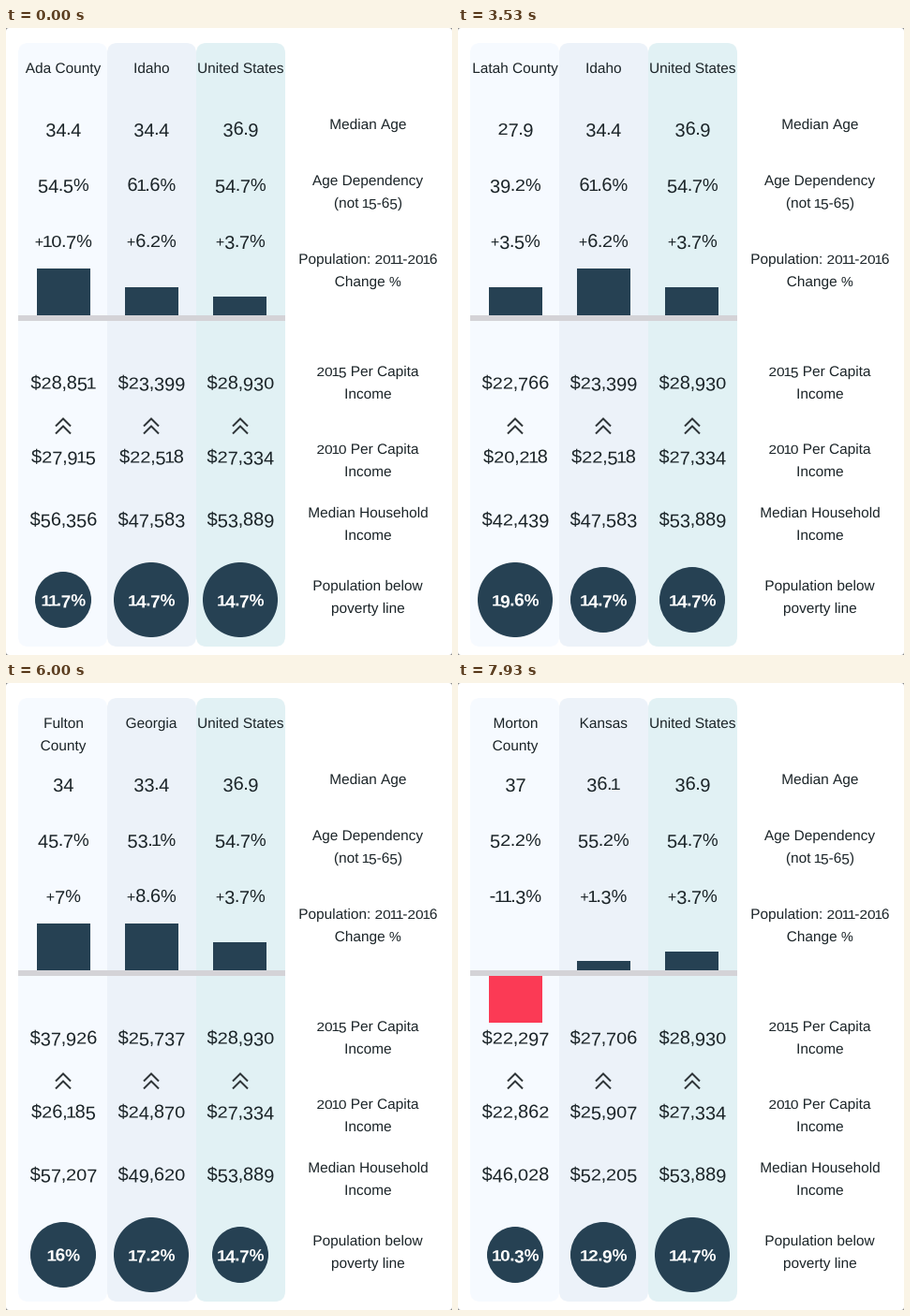
A matplotlib script for the animation above (8 s loop, 476 px wide and 670 px high).

```python
import math
from functools import lru_cache

import matplotlib.pyplot as plt
import numpy as np
from matplotlib.animation import FuncAnimation
from matplotlib.patches import Circle, FancyBboxPatch, PathPatch, Rectangle
from matplotlib.path import Path
from matplotlib.textpath import TextPath

W, H, DPI = 476, 670, 100
LOOP, STEP = 8000, 50
INK, NAVY, RED, RULE = "#1b2428", "#264153", "#fb3a55", "#d4d3d7"
COLUMNS = [(13, "#f6faff"), (108, "#ecf2f9"), (203, "#e1f1f4")]
CENTERS = (61, 155, 250)
BASELINES = {"age": 114, "dep": 174, "pop": 234, "pc15": 385.5,
             "pc10": 464.5, "house": 531.5}
LABELS = [("Median Age", 108), ("Age Dependency", 168), ("(not 15-65)", 192),
          ("Population: 2011-2016", 252), ("Change %", 276),
          ("2015 Per Capita", 372), ("Income", 396),
          ("2010 Per Capita", 455), ("Income", 479),
          ("Median Household", 523), ("Income", 547),
          ("Population below", 601), ("poverty line", 625)]

KEYS = ("name", "age", "dep", "pop", "pc15", "pc10", "house", "poor")
IDAHO = ("Idaho", 34.4, 61.6, 6.2, 23399, 22518, 47583, 14.7)
COUNTIES = [("Ada County", 34.4, 54.5, 10.7, 28851, 27915, 56356, 11.7),
            ("Latah County", 27.9, 39.2, 3.5, 22766, 20218, 42439, 19.6),
            ("Fulton\nCounty", 34, 45.7, 7.8, 37926, 37211, 57207, 16),
            ("Dallas\nCounty", 32.3, 52.2, 7, 27605, 26185, 50270, 17.9),
            ("Morton\nCounty", 37, 52.2, -11.3, 22297, 22862, 46028, 10.3)]
STATES = [IDAHO, IDAHO,
          ("Georgia", 35, 53.1, 5.1, 25737, 25134, 49620, 17.2),
          ("Texas", 33.4, 55.2, 8.6, 26999, 24870, 53207, 15.9),
          ("Kansas", 36.1, 55.2, 1.3, 27706, 25907, 52205, 12.9)]
NATION = [("United States", 36.9, 54.7, 3.7, 28930, 27334, 53889, 14.7)] * 5
TABLE = (COUNTIES, STATES, NATION)

# Each row refreshes at its own delay (county, state, nation) after a switch
SWITCHES = (2500, 4400, 6150, 7730)
DELAYS = {"name": (0, 0, 0), "age": (100, -150, 0), "dep": (280, 280, 0),
          "pop": (-200, -200, 0), "pc15": (50, 50, 0), "pc10": (-180, -180, 0),
          "house": (100, 100, 0), "poor": (50, 50, 0)}

# Gentle old-style figures: (vertical scale, uniform scale, shift in em)
SHAPES = {**dict.fromkeys("012", (0.86, 1, 0)),
          **dict.fromkeys("34579", (1, 1, -0.1)),
          "%": (1, 0.94, 0), "+": (1, 0.8, 0)}
ADVANCES = {"1": 0.41, ".": 0.23, ",": 0.25}


@lru_cache(maxsize=None)
def glyph(char, weight):
    """Outline and advance of one character, one em high."""
    font = {"family": "Liberation Sans", "weight": weight}

    def outline(s):
        return TextPath((0, 0), s, size=100, prop=font)

    bar = outline("|").vertices[:, 0].max()
    advance = (outline(char + "|").vertices[:, 0].max() - bar) / 100
    if char == " ":
        return None, None, advance
    path = outline(char)
    verts = path.vertices / 100
    squash, scale, shift = SHAPES.get(char, (1, 1, 0))
    verts = verts * (scale, scale * squash) + (0, shift)
    advance *= scale
    if char in ADVANCES:
        verts = verts + ((ADVANCES[char] - advance) / 2, 0)
        advance = ADVANCES[char]
    return verts, path.codes, advance


@lru_cache(maxsize=None)
def text_path(text, cx, baseline, size, weight="normal"):
    """Centred lines of text as one path."""
    verts, codes = [], []
    for i, line in enumerate(text.split("\n")):
        x, parts = 0, []
        for char in line:
            v, c, advance = glyph(char, weight)
            if v is not None:
                parts.append(v + (x, 0))
                codes.append(c)
            x += advance
        pts = np.concatenate(parts)
        mid = (pts[:, 0].min() + pts[:, 0].max()) / 2
        verts.append((pts - (mid, 0)) * (size, -size) + (cx, baseline + 24 * i))
    return Path(np.concatenate(verts), np.concatenate(codes))


def show(key, value):
    if key == "name":
        return value
    if key == "age":
        return f"{value:g}"
    if key == "pop":
        return f"{value:+g}%"
    if key in ("dep", "poor"):
        return f"{value:g}%"
    return f"${value:,}"


def current(key, t):
    """Values of one row in all three columns at time t."""
    row = KEYS.index(key)
    return [column[sum(t >= s + delay for s in SWITCHES)][row]
            for column, delay in zip(TABLE, DELAYS[key])]


fig = plt.figure(figsize=(W / DPI, H / DPI), dpi=DPI, facecolor="#8c8c8c")
ax = fig.add_axes([0, 0, 1, 1])
ax.set(xlim=(0, W), ylim=(H, 0))
ax.axis("off")


def rounded(x, y, w, h, radius, color):
    ax.add_patch(FancyBboxPatch((x, y), w, h, lw=0, fc=color,
                                boxstyle=f"round,pad=0,rounding_size={radius}"))


def add_text(color, z=4, path=None):
    return ax.add_patch(PathPatch(path or Path([(0, 0)]), fc=color, lw=0, zorder=z))


rounded(0, 0, W, H, 3, "white")
for x, color in COLUMNS:
    rounded(x, 16, 95, 645, 11, color)
ax.add_patch(Rectangle((13, 307), 285, 6, fc=RULE, lw=0, zorder=2))
for label, y in LABELS:
    add_text(INK, path=text_path(label, 386, y, 15.4))
for cx in CENTERS:
    for y in (417.5, 425.5):
        ax.plot([cx - 8, cx, cx + 8], [y + 8, y, y + 8], color="#2f3538",
                lw=2 * 72 / DPI, solid_joinstyle="miter", solid_capstyle="butt")

cells = {key: [add_text("white" if key == "poor" else INK) for _ in CENTERS]
         for key in KEYS}
bars = [ax.add_patch(Rectangle((x, 307), 57, 0, lw=0, zorder=3))
        for x in (33, 127, 221)]
dots = [ax.add_patch(Circle((cx, 611), 40, fc=NAVY, lw=0, zorder=3))
        for cx in CENTERS]


def update(frame):
    t = frame * STEP
    for key, texts in cells.items():
        for patch, cx, value in zip(texts, CENTERS, current(key, t)):
            if key == "name":
                style = (48, 15.4)
            elif key == "poor":
                style = (617.5, 19, "bold")
            else:
                style = (BASELINES[key], 20)
            patch.set_path(text_path(show(key, value), cx, *style))

    growth = current("pop", t)
    top = max(map(abs, growth))
    for bar, value in zip(bars, growth):
        height = 10 * math.ceil(5 * abs(value) / top)
        bar.set_y(307 - height if value > 0 else 313)
        bar.set_height(height)
        bar.set_facecolor(NAVY if value > 0 else RED)

    poverty = current("poor", t)
    for dot, value in zip(dots, poverty):
        dot.set_radius(40 - 5 * sum(other > value for other in poverty))
    return []


anim = FuncAnimation(fig, update, frames=LOOP // STEP, interval=STEP,
                     init_func=lambda: update(0), repeat=True, repeat_delay=0)
plt.show()
```
